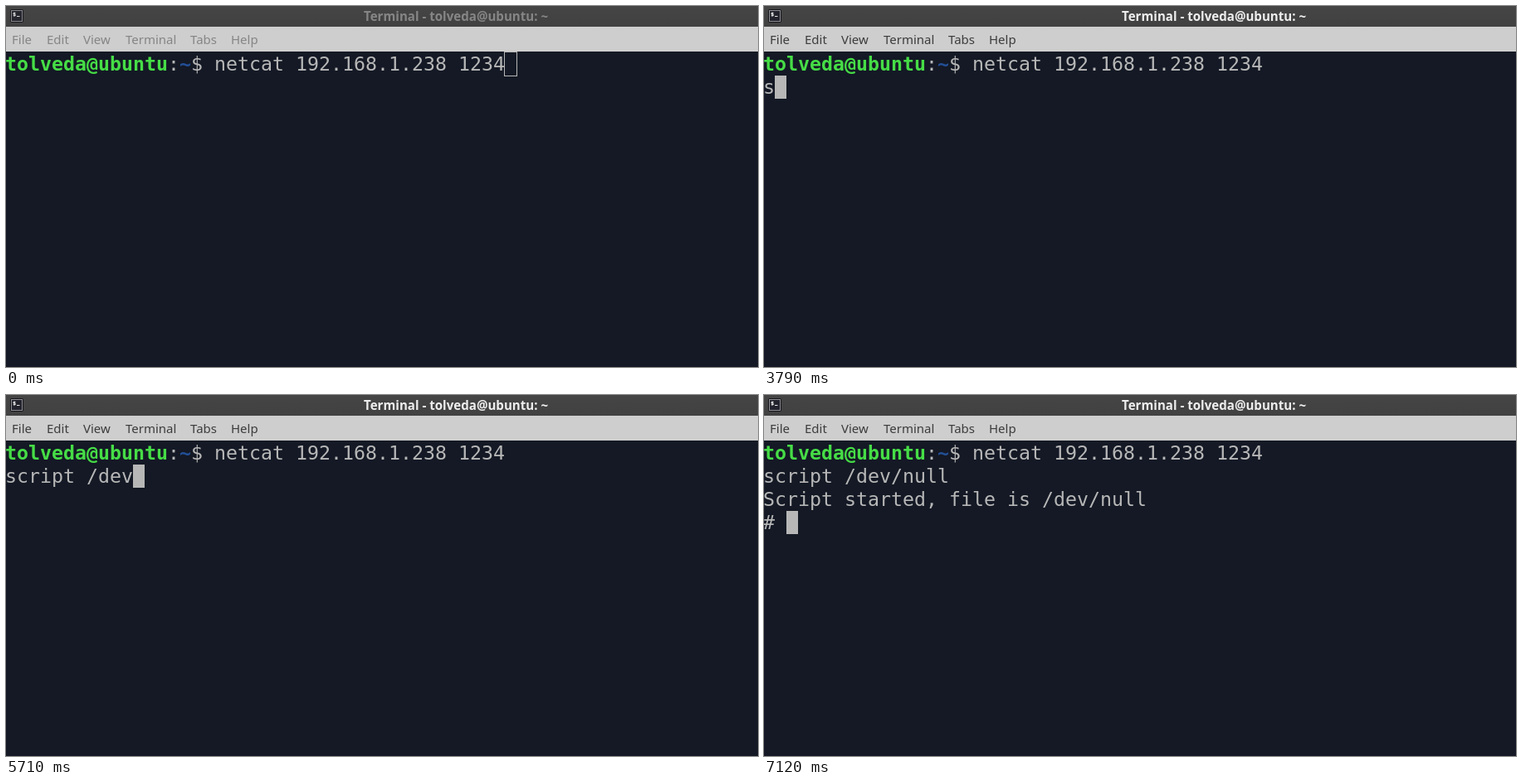
Recreate the animation shown at these times as an HTML page. Size 906 by 436 pixels, loop 8000 ms.

```html
<!DOCTYPE html>
<html lang="en">
<head>
<meta charset="utf-8">
<title>Terminal</title>
<style>
  html, body { margin: 0; width: 100%; height: 100%; overflow: hidden; background: #141925; }
  #stage { position: relative; width: 906px; height: 436px; overflow: hidden;
    --title: #eee; --menu: #3c3c3c; font: 15px/20px "Noto Sans", sans-serif; }
  #stage.idle { --title: #868686; --menu: #858585; }
  #stage.idle .icon { opacity: .9; }
  #stage * { position: absolute; white-space: pre; }
  .titlebar { top: 0; width: 906px; height: 25px; background: linear-gradient(#454545, #414141); }
  .titlebar span { left: 431px; top: 2px; font-size: 15.1px; font-weight: 700; color: var(--title); }
  .icon { left: 5px; top: 4px; }
  .menubar { top: 25px; width: 906px; height: 30px; background: #cecece; }
  .menubar span { top: 5px; color: var(--menu); }
  .screen { left: -1px; top: 56px; color: #b7b7b7; font: 23.25px/28px "DejaVu Sans Mono", monospace; }
  .screen div { left: 0; top: 0; }
  #stage .screen span { position: static; font-weight: 700; }
  .user { color: #46dd46; }
  .path { color: #234f96; }
  #typed { top: 28px; }
  #output { top: 56px; }
  #cursor { width: 14px; height: 28px; background: #b7b7b7; }
  .idle #cursor { background: none; outline: 1px solid #b7b7b7; }
</style>
</head>
<body>
<div id="stage" class="idle">
  <div class="titlebar">
    <svg class="icon" width="16" height="16">
      <rect x=".5" y=".5" width="15" height="15" rx="1" fill="#23232d" stroke="#15151a"/>
      <rect x="1.5" y="1.5" width="13" height="13" fill="none" stroke="#8e8e94"/>
      <path d="M6.5 4.5H4v1.5h2.2v1.7H3.7M5 3.6v5M8 8.5h3.5" fill="none" stroke="#e6e6e6"/>
    </svg>
    <span>Terminal - tolveda@ubuntu: ~</span>
  </div>
  <div class="menubar">
    <span style="left:7px">File</span>
    <span style="left:49px">Edit</span>
    <span style="left:93px">View</span>
    <span style="left:144px">Terminal</span>
    <span style="left:222px">Tabs</span>
    <span style="left:271px">Help</span>
  </div>
  <div class="screen">
    <div id="cursor"></div>
    <div><span class="user">tolveda@ubuntu</span>:<span class="path">~</span>$ netcat 192.168.1.238 1234</div>
    <div id="typed"></div>
    <div id="output"></div>
  </div>
</div>
<script>
  const LOOP = 8000, CELL = 14, LINE = 28;
  const FOCUS = 1260, CONNECT = 2070, ENTER = 7050, REPLY = 7120;
  const COMMAND = "script /dev/null";
  const KEY_TIMES = [3790, 3990, 4130, 4260, 4320, 4450, 4580, 5240,
                     5440, 5570, 5710, 5840, 6050, 6170, 6320, 6440];
  const [stage, cursor, typed, output] =
    ["stage", "cursor", "typed", "output"].map(id => document.getElementById(id));

  function setText(node, text) {
    if (node.textContent !== text) node.textContent = text;
  }

  function cursorCell(t, keys) {
    if (t < CONNECT) return [43, 0];
    if (t < ENTER) return [keys, 1];
    return t < REPLY ? [0, 2] : [2, 3];
  }

  function draw() {
    const t = performance.now() % LOOP;
    const keys = KEY_TIMES.filter(time => time <= t).length;
    const [column, row] = cursorCell(t, keys);
    stage.classList.toggle("idle", t < FOCUS);
    setText(typed, COMMAND.slice(0, keys));
    setText(output, t < REPLY ? "" : "Script started, file is /dev/null\n# ");
    cursor.style.left = column * CELL + "px";
    cursor.style.top = row * LINE + "px";
    requestAnimationFrame(draw);
  }
  draw();
</script>
</body>
</html>
```
